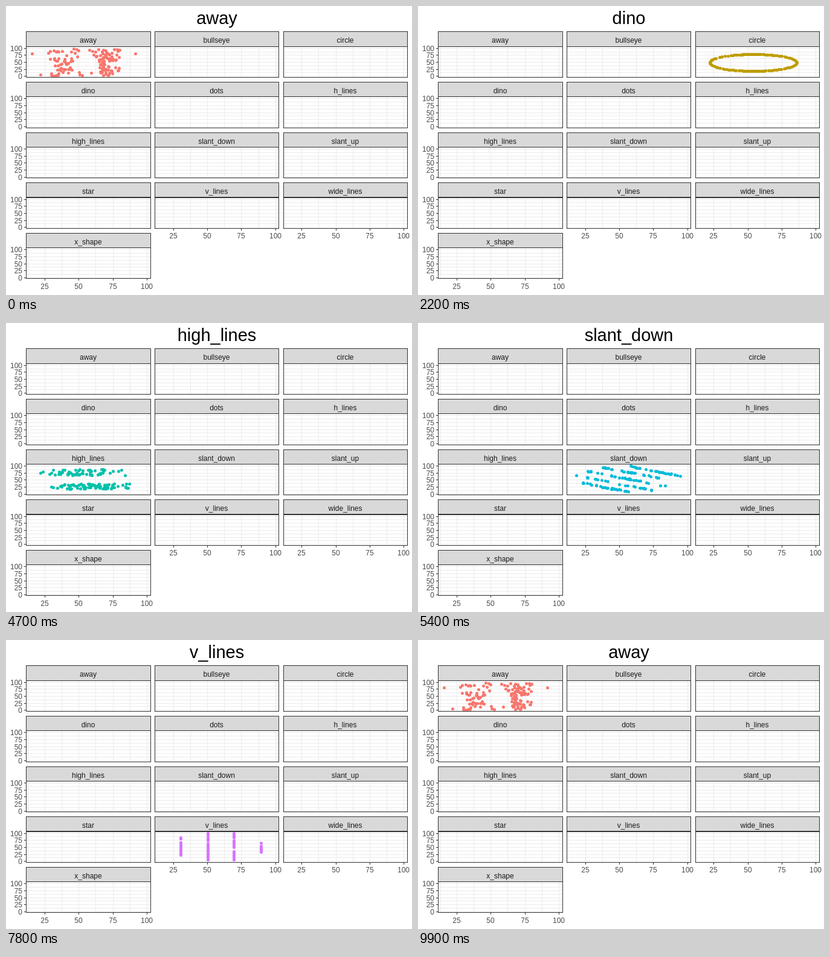
Recreate the animation shown at these times as an HTML page with a canvas. Size 672 px wide and 480 px high, loop 10 s.

```html
<!DOCTYPE html>
<html lang="en">
<head>
<meta charset="utf-8">
<title>Thirteen scatter plots</title>
<style>
  html, body { margin: 0; width: 100%; height: 100%; overflow: hidden; background: #fff; }
  canvas { display: block; }
</style>
</head>
<body>
<canvas id="stage" width="672" height="480"></canvas>
<script>
const ctx = document.getElementById('stage').getContext('2d');
const FONT = '"Liberation Sans", Arial, sans-serif';
const LOOP = 10000;
const INK = '#333333', GRID = '#ebebeb';

let seed = 7;
const random = () => (seed = (seed * 16807) % 2147483647) / 2147483647;
const spread = r => (random() * 2 - 1) * r;
const bell = (a, b) => a + (b - a) * (random() + random()) / 2;
const times = (n, make) => Array.from({ length: n }, (_, i) => make(i));

// All shapes below are lists of [x, y] in data units.

// Points at an even spacing along a polyline such as "x,y x,y x,y".
function line(path, n, jitter = 0) {
  const pts = path.split(' ').map(pair => pair.split(',').map(Number));
  const lengths = pts.slice(1).map((p, i) => Math.hypot(p[0] - pts[i][0], p[1] - pts[i][1]));
  const total = lengths.reduce((a, b) => a + b);
  return times(n, k => {
    let d = total * k / (n - 1), i = 0;
    while (i < lengths.length - 1 && d > lengths[i]) d -= lengths[i++];
    const t = d / lengths[i], [a, b] = [pts[i], pts[i + 1]];
    return [a[0] + (b[0] - a[0]) * t + spread(jitter), a[1] + (b[1] - a[1]) * t + spread(jitter)];
  });
}

// An ellipse; squeeze gathers the points at its top and bottom.
const ring = (cx, cy, rx, ry, n, squeeze = 0) => times(n, i => {
  const even = (i + spread(0.6)) / n * Math.PI * 2;
  const a = even + squeeze * Math.sin(2 * even);
  return [cx + rx * Math.cos(a), cy + ry * Math.sin(a)];
});

const band = (x0, x1, y0, y1, n) => times(n, () => [bell(x0, x1), y0 + random() * (y1 - y0)]);

const slant = (slope, offset, x0, x1) => times(28, () => {
  const x = x0 + random() * (x1 - x0);
  return [x, slope * x + offset + spread(2)];
});

// Two clouds that keep clear of the middle.
function away() {
  const points = [[15.6, 80], [22, 6], [91.6, 79]];
  while (points.length < 142) {
    const x = random() < 0.52 ? bell(27, 57) : bell(54, 82), y = 1 + random() * 96;
    if (Math.hypot((x - 56) / 9, (y - 48) / 27) > 1) points.push([x, y]);
  }
  return points;
}

const dino = () => [
  ...line('55,97 46,94.5 41,88 29,74.5 23,66 22.3,57 26,51 35,51 44,53 57,56 61,62 62,69', 29),
  ...line('57,55 45,36 35,30 30,37 38,49', 15),
  ...line('30,36 30,29 36,25 44,25.6 57,42 68,48 71.5,64 69.5,69.5', 23),
  ...line('47,80 48,84 57,86 56,83 48,77.5', 11),
  ...line('58,99.5 65,97.5 71,91 77,75 86,47.5 98.2,33.7', 21),
  ...line('57,40.6 61,34 64,25', 6),
  ...line('74,23 63,19 50,17.5 45,13.7', 13),
  ...line('49,14.9 56,14.1 47,10 46,6', 8),
  ...line('50.5,9.5 60,10.6 78,10.6', 9),
  ...line('68,8.7 68.2,3', 3),
  ...line('29.7,60 31.3,62.5', 3)
];

const dots = () => [
  ...times(135, i => {
    const col = i % 3, row = Math.floor(i / 3) % 3;
    return [26 + 24.8 * col + (row === 1 ? 1.6 : 0) + spread(0.6), 17.5 + 33.5 * row + spread(1.5)];
  }),
  ...line('50.5,84 52.2,95', 6),
  ...line('75.5,84 76.3,90', 4)
];

function star() {
  const corners = times(11, i => {
    const a = Math.PI / 2 + i * Math.PI / 5, size = i % 2 ? 0.42 : 1;
    return [57 + 30.5 * size * Math.cos(a), 51 + 42 * size * Math.sin(a)];
  });
  return line(corners.join(' '), 142, 0.5);
}

const vLines = () => [
  '30.5,84 30.5,80', '30.5,67 30.5,22',
  '50.3,99 50.3,93', '50.3,84 50.3,73', '50.3,63 50.3,28', '50.3,24 50.3,5',
  '69.5,99 69.5,84', '69.5,73 69.5,50', '69.5,35 69.5,5',
  '89.5,65 89.5,64', '89.5,54 89.5,33'
].flatMap(path => line(path, 13));

const PLOTS = [
  ['away', '#F8766D', 0, 0, away()],
  ['bullseye', '#E18A00', 600, 700, [...ring(55.4, 48, 36, 37, 92), ...ring(54, 48, 17, 18, 50)]],
  ['circle', '#BE9C00', 1400, 1500, ring(54.1, 47.8, 31.9, 30, 142, 0.35)],
  ['dino', '#8CAB00', 2200, 2300, dino()],
  ['dots', '#24B700', 3000, 3100, dots()],
  ['h_lines', '#00BE70', 3800, 3900,
    times(5, i => band(22 + 3 * i, 98 - 5 * i, 49 + 20 * (i % 2 ? -1 : 1) * Math.ceil(i / 2),
      51 + 20 * (i % 2 ? -1 : 1) * Math.ceil(i / 2), 28)).flat()],
  ['high_lines', '#00C1AB', 4600, 4700, [...band(18, 87, 66, 88, 60), ...band(27, 95, 16, 36, 82)]],
  ['slant_down', '#00BBDA', 5300, 5400,
    [[60, 22, 58], [82, 18, 74], [106, 27, 84], [130, 36, 92], [152, 58, 95]]
      .flatMap(range => slant(-0.93, ...range))],
  ['slant_up', '#00ACFC', 6100, 6200,
    [[52, 20, 51], [31.5, 20, 72], [7, 27, 82], [-24, 41, 86], [-42, 53, 96]]
      .flatMap(range => slant(0.93, ...range))],
  ['star', '#8B93FF', 6900, 7000, star()],
  ['v_lines', '#D575FE', 7700, 7800, vLines()],
  ['wide_lines', '#F962DD', 8500, 8500, [...band(27, 44, 0, 99, 62), ...band(61, 78, 0, 99, 80)]],
  ['x_shape', '#FF65AC', 9200, 9200, [...line('32,96 85,6', 71, 2), ...line('32,6 85,96', 71, 2)]]
].map(([name, color, titleAt, pointsAt, points], i) => {
  const col = i % 3, row = Math.floor(i / 3);
  const x = 33.2 + col * 212.7, y = 42.3 + row * 83.65;
  return {
    name, color, titleAt, pointsAt, points, col, row,
    left: Math.round(x), right: Math.round(x + 205.5),
    strip: Math.round(y), stripEnd: Math.round(y + 24.22),
    top: Math.round(y + 24.35), bottom: Math.round(y + 75.57),
    axisText: Math.round(y + 92.8),
    px: v => Math.round(x + (v - 11.42) * 2.256),
    py: v => Math.round(y + 74 - v * 0.466)
  };
});

function rect(x, y, w, h, color) {
  ctx.fillStyle = color;
  ctx.fillRect(x, y, w, h);
}

function frame(x0, y0, x1, y1) {
  ctx.strokeStyle = INK;
  ctx.lineWidth = 1;
  ctx.strokeRect(x0 + 0.5, y0 + 0.5, x1 - x0, y1 - y0);
}

function label(text, x, y, size, color, align = 'center') {
  ctx.font = `${size}px ${FONT}`;
  ctx.textAlign = align;
  ctx.fillStyle = color;
  ctx.fillText(text, x, y);
}

function drawPoints(p) {
  ctx.save();
  ctx.beginPath();
  ctx.rect(p.left, p.top, p.right - p.left, p.bottom - p.top);
  ctx.clip();
  ctx.fillStyle = p.color;
  ctx.beginPath();
  for (const [x, y] of p.points) {
    const cx = p.px(x) + 0.5, cy = p.py(y) + 0.5;
    ctx.moveTo(cx + 2.5, cy);
    ctx.arc(cx, cy, 2.5, 0, Math.PI * 2);
  }
  ctx.fill();
  ctx.restore();
}

function drawPanel(p, active) {
  const width = p.right - p.left, height = p.bottom - p.top;

  for (let v = 0; v <= 100; v += 12.5) {
    if (v > 0) rect(p.px(v), p.top, 1, height, GRID);
    rect(p.left, p.py(v), width, 1, GRID);
  }
  if (active) drawPoints(p);

  rect(p.left, p.strip, width, p.stripEnd - p.strip, '#d9d9d9');
  frame(p.left, p.strip, p.right, p.stripEnd);
  frame(p.left, p.top, p.right, p.bottom);
  label(p.name, (p.left + p.right) / 2, p.strip + 19, 12, '#1a1a1a');

  for (let v = 0; v <= 100; v += 25) {
    if (p.col === 0) {
      rect(p.left - 3, p.py(v), 3, 1, INK);
      label(v, p.left - 6, p.py(v) + 5, 12, '#4d4d4d', 'right');
    }
    if (v > 0 && (p.row === 4 || p.row === 3 && p.col > 0)) {
      rect(p.px(v), p.bottom + 1, 1, 3, INK);
      label(v, p.px(v), p.axisText, 12, '#4d4d4d');
    }
  }
}

function draw(now) {
  const t = now % LOOP;
  const current = key => t >= 9900 ? PLOTS[0] : PLOTS.filter(p => p[key] <= t).pop();
  const active = current('pointsAt');
  rect(0, 0, 672, 480, '#fff');
  for (const p of PLOTS) drawPanel(p, p === active);
  label(current('titleAt').name, 349, 30, 29, '#000');
}

let start;
function tick(now) {
  start ??= now;
  draw(now - start);
  requestAnimationFrame(tick);
}
draw(0);
requestAnimationFrame(tick);
</script>
</body>
</html>
```
